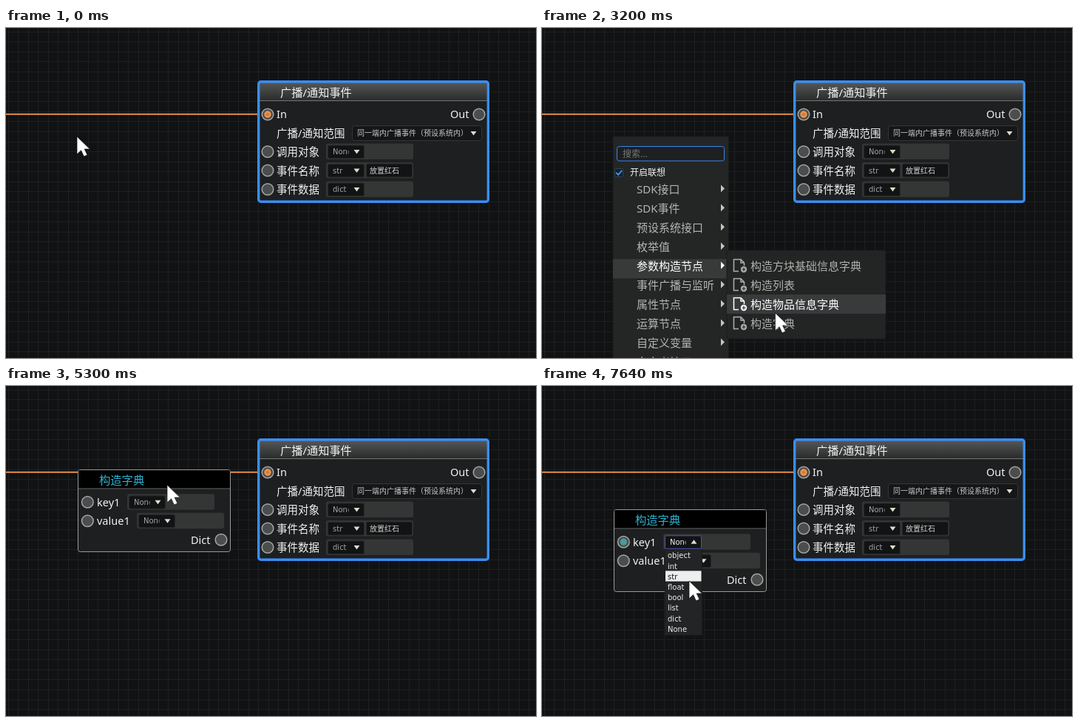
Write an HTML page that moves like this. It is 717x447 px and loops after 8 s.

```html
<!DOCTYPE html>
<html lang="zh-CN">
<head>
<meta charset="utf-8">
<style>
  html, body { margin: 0; width: 100%; height: 100%; overflow: hidden; background: #111214; }
  svg { display: block; }
  text {
    font-family: "Noto Sans", "Noto Sans CJK SC", "Noto Sans CJK", sans-serif;
    white-space: pre;
  }
  .small { font-family: "DejaVu Sans", "Noto Sans CJK SC", "Noto Sans CJK", sans-serif; }
</style>
</head>
<body>
<svg id="stage" width="717" height="447" viewBox="0 0 717 447">
  <defs>
    <linearGradient id="head" x2="0" y2="1">
      <stop stop-color="#555756"/>
      <stop offset="1" stop-color="#2a2c2c"/>
    </linearGradient>
  </defs>
  <g id="back"></g>
  <g id="live"></g>
</svg>
<script>
const LOOP = 8000, CELL = 13.55, SNAP = 13.5, ROW = 26, OPTION = 14.2;

const MENU = ['SDK接口', 'SDK事件', '预设系统接口', '枚举值', '参数构造节点',
  '事件广播与监听', '属性节点', '运算节点', '自定义变量', '自定义接口'];
const SUBMENU = ['构造方块基础信息字典', '构造列表', '构造物品信息字典', '构造字典'];
const TYPES = ['object', 'int', 'str', 'float', 'bool', 'list', 'dict', 'None'];

// Pointer path: time, x, y
const PATH = [
  [0, 96, 147], [1340, 96, 147], [1750, 134, 232], [2170, 176, 321], [2240, 175, 317],
  [2450, 175, 317], [2740, 262, 328], [3000, 314, 383], [3140, 314, 383], [3600, 325, 405],
  [4680, 325, 405], [5000, 268, 250], [5300, 218, 134], [5500, 218, 134], [5840, 224, 195],
  [6040, 224, 195], [6310, 203, 221], [6380, 190, 216], [6580, 190, 216], [6710, 198, 221],
  [7150, 198, 221], [7640, 199, 264], [LOOP, 199, 264]
];
// Press flashes: start, end
const PRESSES = [[790, 930], [4020, 4280], [5430, 5570], [6970, 7110]];

const rect = (x, y, w, h, fill, stroke = 'none', r = 0, line = 1) =>
  `<rect x="${x}" y="${y}" width="${w}" height="${h}" rx="${r}" fill="${fill}" stroke="${stroke}" stroke-width="${line}"/>`;
const text = (x, y, s, size = 14.5, fill = '#f2f2f2', cls = '') =>
  `<text x="${x}" y="${y}" font-size="${size}" fill="${fill}" class="${cls}">${s}</text>`;
const small = (x, y, s, fill) => text(x, y, s, 10, fill, 'small');
const path = (d, fill, stroke = 'none', line = 1) =>
  `<path d="${d}" fill="${fill}" stroke="${stroke}" stroke-width="${line}"/>`;
const circle = (x, y, r, fill, extra = '') =>
  `<circle cx="${x}" cy="${y}" r="${r}" fill="${fill}" ${extra}/>`;
const move = (x, y, body) => `<g transform="translate(${x} ${y})">${body}</g>`;

const port = (x, y, dot) =>
  circle(x, y, 7.8, '#4c4d4d', 'stroke="#a4a5a4" stroke-width="1.5"') +
  (dot ? circle(x, y, 4.7, dot) : '');
const arrow = (x, y, up) => {
  const d = up ? -1 : 1;
  return path(`M${x - 4} ${y - 2.5 * d}h8l-4 ${5.5 * d}z`, '#dcdccb');
};

// Wide grey field holding a type selector
function field(x, y, label, open) {
  return rect(x, y, 118, 21.5, '#343635', 'none', 3) +
    rect(x + 2.5, y + 2.5, 49, 17.5, '#121314', open ? '#4e54b4' : '#28292a', 2) +
    `<svg x="${x + 9}" y="${y}" width="21.5" height="21">` +
    small(0, 14.5, label, open ? '#f0f0f0' : '#a3a5a3') + '</svg>' +
    arrow(x + 41.5, y + 11, open);
}

function backdrop() {
  let grid = '';
  for (let x = 2.5; x < 717; x += CELL) grid += `M${Math.round(x) + .5} 0V447`;
  for (let y = 4.5; y < 447; y += CELL) grid += `M0 ${Math.round(y) + .5}H717`;
  const rows = [['调用对象', 'None'], ['事件名称', 'str'], ['事件数据', 'dict']];
  return path(grid, 'none', '#1d1f21') +
    rect(0, 115.8, 347, 1.9, '#ef944a') +
    rect(341.7, 72.7, 310.6, 162.6, '#1d1f20', 'none', 3) +
    rect(343, 74, 308, 24, 'url(#head)') +
    rect(343, 98, 308, 1, '#747675') +
    rect(341.7, 72.7, 310.6, 162.6, 'none', '#3a8ef6', 3, 3.4) +
    text(371, 93, '广播/通知事件', 15.2) +
    port(354, 117, '#ef944a') + circle(354, 117, 2.3, '#d27c38') +
    text(366, 122, 'In') + text(601, 122, 'Out') + port(640, 117) +
    text(366, 148, '广播/通知范围') +
    rect(468.5, 132.5, 175, 20, '#141617', '#343637', 3) +
    small(475, 146.3, '同一端内广播事件（预设系统内）', '#c9cac8') + arrow(632.5, 142.5) +
    rows.map(([name, type], i) => {
      const y = 167.5 + i * 25.5;
      return port(354, y) + text(366, y + 5.5, name) + field(433, y - 11, type);
    }).join('') +
    rect(487.5, 184, 62, 18, '#121314', '#28292a', 2) +
    small(492, 197, '放置红石', '#d2d3d2');
}

// Node drawn relative to its top left corner
function dictNode(hover, open) {
  const teal = i => hover === i ? '#4b9a9c' : '';
  return rect(.5, .5, 206, 111, '#1d1f20', '#9a9b95', 3) +
    rect(1, 1, 205, 24.5, '#000', 'none', 2) +
    rect(1, 25.5, 205, 1, '#5c5e5c') +
    text(29, 19.7, '构造字典', 15.3, '#2db4d3') +
    port(13.3, 44.3, teal(0)) + text(26, 49.8, 'key1') + field(67, 33.3, 'None', open) +
    port(13.3, 69.8, teal(1)) + text(26, 75.2, 'value1') + field(80, 58.8, 'None') +
    text(153, 100.7, 'Dict') + port(194, 95.3);
}

function menu(hover, caret) {
  return rect(96, 147, 156.5, 310, '#242625', '#1a1b1b') +
    rect(101.5, 160.5, 145, 19.5, '#1d1f20', '#3a84ea', 3) +
    text(109, 174.7, '搜索...', 12, '#777978') +
    (caret ? rect(110, 162, 1, 17, '#f0f0f0') : '') +
    rect(98.5, 190.5, 11, 11, '#15202b', '#33414e', 1) +
    path('M100.3 195.8l2.8 3 5-5.8', 'none', '#409cf5', 1.8) +
    text(119, 199.7, '开启联想', 12) +
    MENU.map((name, i) => {
      const y = 218 + i * ROW, on = i === hover;
      const ink = on ? '#fff' : '#b3b5b3';
      return (on ? rect(96, y - 9, 156.5, ROW, '#383a3a') : '') +
        text(128, y + 5.7, name, 15, ink) +
        path(`M242 ${y - 5.5}l5 5-5 5z`, on ? '#fff' : '#c5c6c4');
    }).join('');
}

function submenu(hover) {
  return rect(250, 301, 215, 120, '#232524', '#1a1b1b', 3) +
    SUBMENU.map((name, i) => {
      const y = 322 + i * ROW, on = i === hover, ink = on ? '#fff' : '#aeb0ad';
      const page = path('M7 16.5H.5V.5H10L14.5 5V9M10 .5V5H14.5', 'none', ink, 1.5) +
        circle(14, 14, 4.2, ink) + path('M11.5 14h5M14 11.5v5', 'none', '#232524', 1.2);
      return (on ? rect(250, y - 13, 215, ROW, '#383a3b') : '') +
        move(259, y - 9, page) + text(282, y + 5.7, name, 15, ink);
    }).join('');
}

function typeList(hover) {
  return rect(166.5, 221.5, 50, 116, '#232425', '#1a1b1c') +
    TYPES.map((name, i) => {
      const y = 230 + i * OPTION, on = i === hover;
      return (on ? rect(167, y - 8, 48.5, 14.2, '#eee') : '') +
        small(170, y + 3.4, name, on ? '#111' : '#ececec');
    }).join('');
}

function pointer(t) {
  const i = PATH.findIndex(p => p[0] > t);
  const [t0, x0, y0] = PATH[i - 1], [t1, x1, y1] = PATH[i];
  const k = (t - t0) / (t1 - t0);
  return [x0 + (x1 - x0) * k, y0 + (y1 - y0) * k];
}

function scene(t) {
  const [x, y] = pointer(t);
  const between = (a, b) => t >= a && t < b;
  let out = '';

  if (between(1130, 4150)) {
    const subOpen = t >= 2510;
    const caret = Math.floor((t - 1110) / 530) % 2 === 0;
    out += menu(subOpen ? 4 : Math.floor((y - 209) / ROW), caret);
    if (subOpen) out += submenu(x > 250 ? Math.floor((y - 309) / ROW) : -1);
  }

  if (t >= 4280) {
    const steps = t < 5500 ? 0 : t < 5840 ? Math.floor((y - 134) / SNAP) : 4;
    const top = 113 + steps * SNAP, open = t >= 7040;
    const inside = x > 97 && x < 304;
    const hover = open ? 0 : inside ? Math.floor((y - top - 32) / 25.5) : -1;
    out += move(97, top, dictNode(hover, open));
    if (open) out += typeList(y < 222 ? 7 : Math.floor((y - 222) / OPTION));
  }

  if (PRESSES.some(([a, b]) => between(a, b)))
    out += circle(x - .5, y - 1, 15.5, '#f0e020', 'opacity=".65"');
  return out + move(x, y,
    path('M0 0V24L5.6 18.8 9.4 27 14 25 10.2 17H17.5Z', '#fff', '#111', .7));
}

const live = document.getElementById('live');
document.getElementById('back').innerHTML = backdrop();
const start = performance.now();
function frame() {
  live.innerHTML = scene((performance.now() - start) % LOOP);
  requestAnimationFrame(frame);
}
frame();
</script>
</body>
</html>
```
